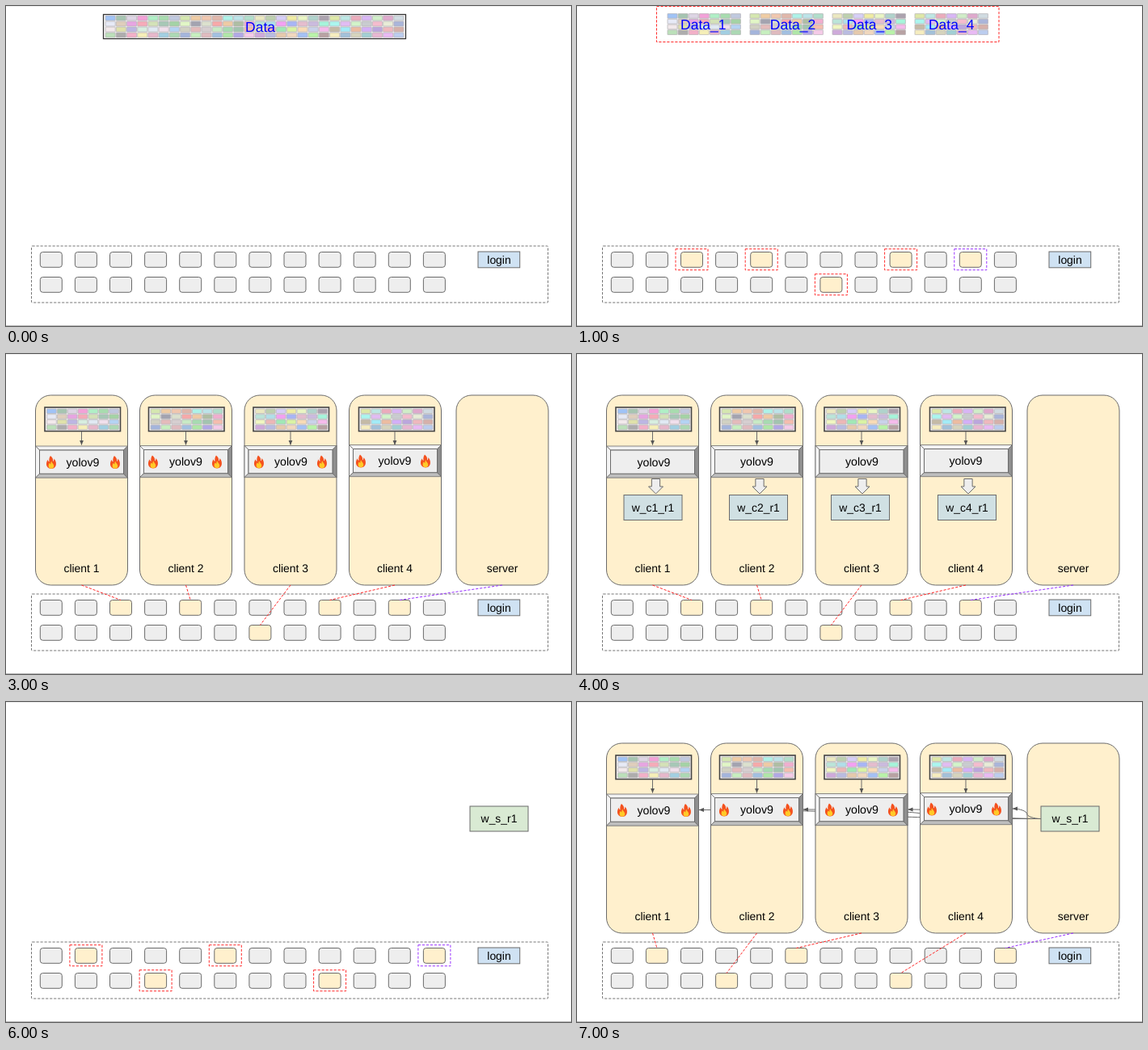
An HTML page for the animation above (8 s loop, 699x396 px).

```html
<!DOCTYPE html>
<html lang="en">
<head>
<meta charset="utf-8">
<title>Federated learning round</title>
<style>
html, body { margin: 0; width: 100%; height: 100%; overflow: hidden; background: #fff; }
svg { display: block; width: 699px; height: 396px; font-family: "Liberation Sans", Arial, sans-serif; text-rendering: geometricPrecision; }
</style>
</head>
<body>
<svg id="stage" viewBox="0 0 699 396" xmlns="http://www.w3.org/2000/svg"></svg>
<script>
const INK = '#6b6b6b', RED = '#ff2a2a', PURPLE = '#9933ff', CREAM = '#fff0cd';
const STEP = 1000, STEPS = 8;

const attrs = o => Object.entries(o).map(([k, v]) => `${k}="${v}"`).join(' ');
const el = (tag, o, body = '') => `<${tag} ${attrs(o)}>${body}</${tag}>`;
const rect = (x, y, w, h, fill, stroke = INK, more = {}) =>
  el('rect', { x, y, width: w, height: h, fill, stroke, ...more });
const path = (d, more = {}) => el('path', { d, fill: 'none', stroke: INK, ...more });
const text = (s, x, y, size = 13.9, fill = '#000') =>
  el('text', { x, y, 'font-size': size, fill, 'text-anchor': 'middle' }, s);
const arrow = d => path(d, { 'marker-end': 'url(#tip)' });
const dashed = color => ({ stroke: color, 'stroke-dasharray': '3.2 1.8' });

const clients = [
  { x: 36.5, bar: 47.5, mid: 93.5, name: 95, fire: [56, 135], block: 97.5, w: 58, out: 94, y: 114 },
  { x: 165.5, bar: 176, mid: 222.5, name: 222.5, fire: [182, 261], block: 226, w: 188.5, out: 224, y: 113.5 },
  { x: 295, bar: 305.5, mid: 352, name: 352.5, fire: [313, 391], block: 353, w: 314.5, out: 350, y: 113.5 },
  { x: 424.5, bar: 436, mid: 481, name: 481, fire: [439, 519], block: 484, w: 446.5, out: 482, y: 112.5 }
];
const parts = [
  { x: 112, label: 156.3, tip: 96 }, { x: 214, label: 267, tip: 223 },
  { x: 316, label: 361.7, tip: 352.5 }, { x: 418, label: 463.2, tip: 482 }
];
// [column, row] of the nodes picked for each client, server last
const picks = [
  [[2, 0], [4, 0], [6, 1], [8, 0], [10, 0]],
  [[1, 0], [3, 1], [5, 0], [8, 1], [11, 0]]
];
const mids = [...clients.map(c => c.mid), 614];
const cellX = c => 42.3 + 43.1 * c;
const cellY = r => 304.5 + 31 * r;
const linkColor = i => i < 4 ? RED : PURPLE;

// Random pastels, one per data tile
function makeTones() {
  let seed = 41;
  const channel = () => {
    seed = (seed * 16807) % 2147483647;
    return Math.round(160 + 88 * seed / 2147483647);
  };
  return Array.from({ length: 112 }, () => `rgb(${channel()},${channel()},${channel()})`);
}
const tones = makeTones();

function tiles(x, y, w, h, from, count) {
  const cw = w / count, ch = h / 4;
  let s = rect(x, y, w, h, '#e9e7e9', 'none');
  for (let c = 0; c < count; c++) for (let r = 0; r < 4; r++)
    s += rect(x + c * cw + .6, y + r * ch + .6, cw - 1.2, ch - 1.2,
      tones[(from + c) * 4 + r], '#b4b0b4', { 'stroke-width': .6, rx: .6 });
  return s;
}

function bevel(x, y, w, h) {
  const i = 5, r = x + w, b = y + h;
  const side = (d, fill) => path(d, { fill, 'stroke-width': .8 });
  return side(`M${x} ${y}H${r}L${r - i} ${y + i}H${x + i}Z`, '#f1f1f1') +
    side(`M${x} ${y}L${x + i} ${y + i}V${b - i}L${x} ${b}Z`, '#f5f5f5') +
    side(`M${x} ${b}L${x + i} ${b - i}H${r - i}L${r} ${b}Z`, '#bebebe') +
    side(`M${r} ${y}V${b}L${r - i} ${b - i}V${y + i}Z`, '#8f8f8f') +
    rect(x + i, y + i, w - 2 * i, h - 2 * i, '#eee');
}

const flame = (x, y) => el('g', { transform: `translate(${x} ${y})` },
  path('M-1-8C2-6 2.5-3 2-1C3-1.5 3.5-3 3.3-4.5C6-2 6.5 2 5.5 4.5C4.5 7 2.5 8 0 8C-4 8-6.3 5-6 1.5C-5.8-.5-5-2-4.4-3.2C-4-1.8-3.5-1-2.5-.5C-3-3.5-2.5-6-1-8Z',
    { fill: '#f4511e', stroke: 'none' }) +
  path('M.3-1.5C.5 1 3.5 2 3.3 4.8C3.1 7 1.8 7.8 0 7.8C-2.3 7.8-3.6 6.2-3.4 4C-3.2 2.4-2.5 1.6-2.2.8C-1.6 1.8-1.2 2.2-.7 2.4C-.7 1-.4-.5.3-1.5Z',
    { fill: '#ffca28', stroke: 'none' }));

// Block arrow: tip at y, dir 1 points down, -1 up
const block = (x, y, dir, half) => {
  const neck = y - 9 * dir, tail = y - 18.5 * dir, shaft = half * .57;
  return path(`M${x} ${y}L${x - half} ${neck}H${x - shaft}V${tail}H${x + shaft}V${neck}H${x + half}Z`, { fill: '#eee' });
};

const weight = (s, x, y, fill) => rect(x, y, 72, 31, fill) + text(s, x + 36, y + 20);

function bend(x0, y0, x1, y1) {
  return arrow(`M${x0} ${y0}C${x0} ${(y0 + y1) / 2} ${(x0 + x1) / 2} ${y1} ${x1} ${y1}`);
}
function sway(x0, y0, x1, y1) {
  const w = x1 - x0, h = y1 - y0, m = x0 + w / 2;
  return arrow(`M${x0} ${y0}C${x0 + w / 4} ${y0} ${m} ${y0 + h / 4} ${m} ${y0 + h / 2}` +
    `C${m} ${y0 + h * .75} ${x0 + w * .75} ${y1} ${x1} ${y1}`);
}

function pool(picked) {
  let s = rect(31.5, 297, 639, 70, 'none', '#777', { 'stroke-dasharray': '3.2 1.8', rx: 1 });
  for (let r = 0; r < 2; r++) for (let c = 0; c < 12; c++) {
    const on = picked.some(p => p[0] === c && p[1] === r);
    s += rect(cellX(c), cellY(r), 27, 18.8, on ? CREAM : '#eee', INK, { rx: 3.2 });
  }
  return s + rect(584, 304, 51.7, 19.8, '#cfe2f3') + text('login', 610, 319);
}

const frames = picked => picked.map(([c, r], i) =>
  rect(cellX(c) - 6.5, cellY(r) - 3.8, 40, 26, 'none', linkColor(i), dashed(linkColor(i)))).join('');

const links = picked => picked.map(([c, r], i) =>
  path(`M${mids[i]} 286L${cellX(c) + 13.5} ${cellY(r)}`, dashed(linkColor(i)))).join('');

const wholeData = () => rect(120.5, 10.5, 374, 30, '#fff', '#333', { 'stroke-width': 1.3 }) +
  tiles(122.5, 11.5, 370, 28, 0, 28) + text('Data', 314.5, 32, 17.5, '#00f');

const splitData = () => parts.map((p, i) => tiles(p.x - .5, 9, 91.5, 27, i * 7, 7) +
  text('Data_' + (i + 1), p.label, 29, 17.5, '#00f')).join('');

const panels = () => [...clients.map(c => c.x), 557].map((x, i) =>
  rect(x, 51, 114, 235, CREAM, INK, { rx: 19 }) +
  text(i < 4 ? 'client ' + (i + 1) : 'server', mids[i], 270)).join('') +
  clients.map((c, i) => rect(c.bar + .5, 66, 93.5, 29.5, '#f6f2f2', '#444', { 'stroke-width': 1.6 }) +
    tiles(c.bar + 2.5, 67.5, 90, 26.5, i * 7, 7)).join('');

const models = hot => clients.map(c => arrow(`M${c.mid} 96V112.5`) + bevel(c.x, c.y, 114, 39.2) +
  text('yolov9', c.name, c.y + 24.5, 14.2) +
  (hot ? c.fire.map(x => flame(x, c.y + 20)).join('') : '')).join('');

const weights = () => clients.map((c, i) => block(c.block, 173, 1, 9) +
  weight(`w_c${i + 1}_r1`, c.w, 174.5, '#d0e0e3')).join('');

const serverWeight = () => weight('w_s_r1', 574, 129, '#d9ead3');

const average = () => bevel(567, 205, 92, 39) + text('Fed Avg', 612.5, 230) +
  block(610.5, 173.5, -1, 10) + serverWeight() + clients.map(c => bend(c.out, 206, 566.5, 224.5)).join('');

const spread = () => clients.map(c => sway(574, 144.5, c.x + 114.5, c.y + 19.5)).join('');

function scene(n) {
  const picked = n === 0 ? [] : picks[n < 6 ? 0 : 1];
  let s = pool(picked);
  if (n === 0) return s + wholeData();
  if (n === 1) return s + splitData() + rect(98.5, .5, 423.5, 44, 'none', RED, dashed(RED)) + frames(picked);
  if (n === 6) return s + frames(picked) + serverWeight();
  s += panels() + links(picked);
  if (n === 2) return s + splitData() +
    parts.map(p => arrow(`M${p.x + 45} 36.5L${p.tip} 66`)).join('');
  if (n === 7) s += spread() + serverWeight();
  s += models(n === 3 || n === 7);
  if (n === 4 || n === 5) s += weights();
  if (n === 5) s += average();
  return s;
}

const defs = '<defs>' + el('marker', {
  id: 'tip', markerUnits: 'userSpaceOnUse', markerWidth: 7, markerHeight: 6,
  refX: 6, refY: 3, orient: 'auto'
}, '<path d="M0 .4L6.2 3L0 5.6Z" fill="#555"/>') + '</defs>';
const edges = path('M0 .5H699', { stroke: '#eee' }) + path('M0 395.5H699', { stroke: '#bdbdbd' });

const stage = document.getElementById('stage');
stage.innerHTML = defs + edges +
  Array.from({ length: STEPS }, (_, n) => el('g', { class: 'step', display: 'none' }, scene(n))).join('');
const steps = stage.querySelectorAll('.step');

let shown = -1;
function show(t) {
  const n = Math.floor(t / STEP) % STEPS;
  if (n === shown) return;
  steps.forEach((g, i) => g.setAttribute('display', i === n ? 'inline' : 'none'));
  shown = n;
}
const start = performance.now();
function tick() {
  show(performance.now() - start);
  requestAnimationFrame(tick);
}
show(0);
requestAnimationFrame(tick);
</script>
</body>
</html>
```
